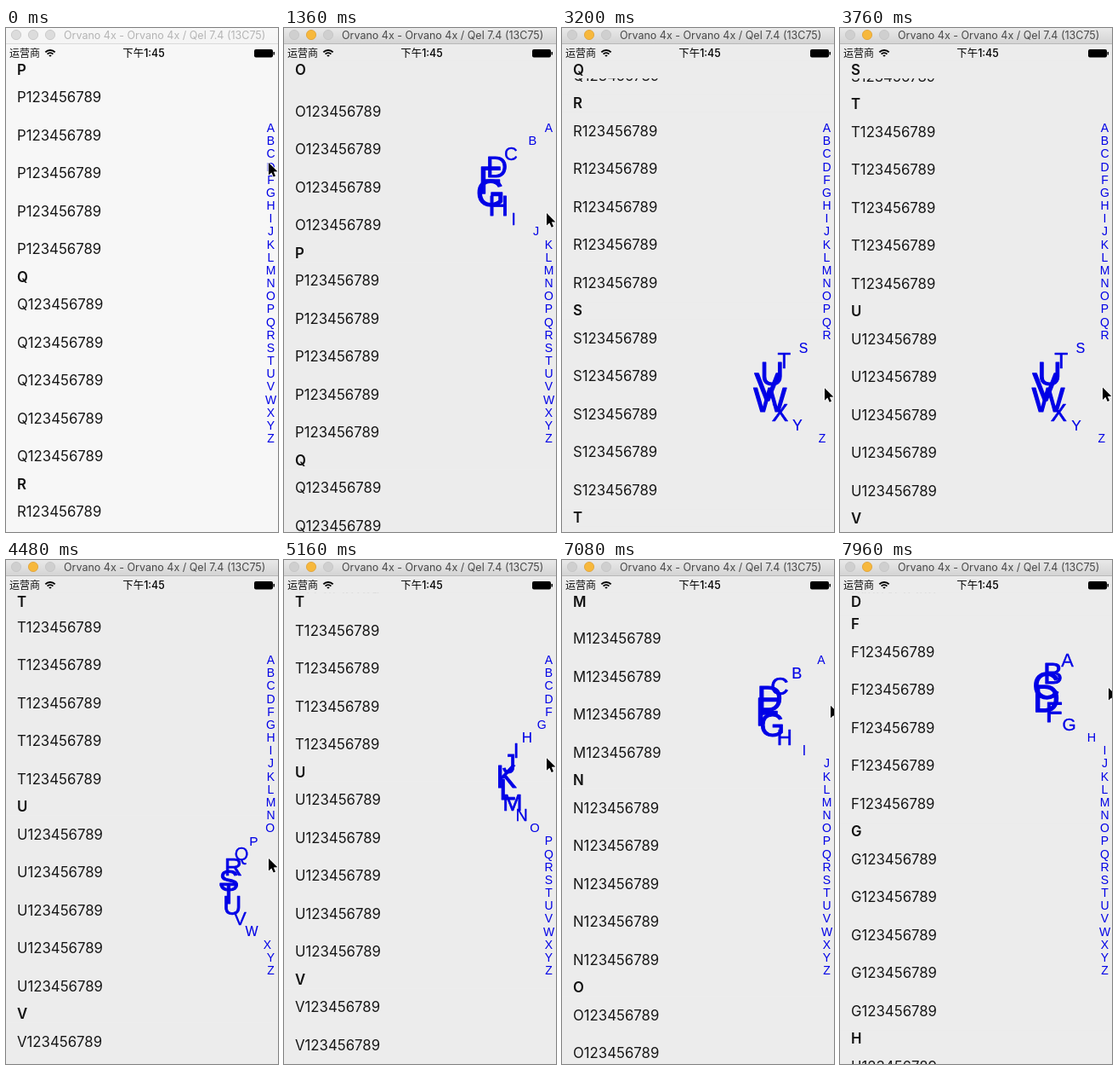
An HTML page with a canvas that plays this animation: 320x591 px, repeating every 8 s.

```html
<!DOCTYPE html>
<html lang="zh">
<head>
<meta charset="utf-8">
<title>Letter index</title>
<style>
  html, body { margin: 0; width: 100%; height: 100%; overflow: hidden; background: #f7f7f7; }
  canvas { display: block; width: 320px; height: 591px; }
</style>
</head>
<body>
<canvas id="stage"></canvas>
<script>
const W = 320, H = 591, LOOP = 8000;
const LETTERS = [...'ABCDFGHIJKLMNOPQRSTUVWXYZ'];
const ROWS = 5, ROW_H = 44.5, HEADER_H = 20.5, SECTION_H = ROWS * ROW_H + HEADER_H;
const LIST_TOP = 38.7, TEXT_X = 13, TEXT_SIZE = 16.75;
const UI_FONT = 'Inter, sans-serif';
const PRESS = 40, WAVE_LAG = 180;

// Pointer height in pixels and list position in sections, as [time, value].
const pointerPath = [[0, 158], [1180, 184], [1360, 217], [2220, 303], [2580, 423],
  [4100, 421], [4980, 257], [5500, 186], [6440, 186], [7960, 150]];
const listPath = [[0, 14], [1360, 13.115], [2400, 12.979], [3760, 17.833],
  [5160, 18.179], [6440, 16.424], [7960, 3.891]];

const canvas = document.getElementById('stage');
const ctx = canvas.getContext('2d');
const ratio = window.devicePixelRatio || 1;
canvas.width = W * ratio;
canvas.height = H * ratio;

const clamp = v => Math.min(1, Math.max(0, v));

function along(path, t) {
  const next = path.findIndex(point => point[0] > t);
  if (next < 0) return path[path.length - 1][1];
  if (next === 0) return path[0][1];
  const [t0, v0] = path[next - 1], [t1, v1] = path[next];
  return v0 + (v1 - v0) * (t - t0) / (t1 - t0);
}

// The wave trails the pointer and flattens while it travels.
function waveAt(t) {
  const centre = along(pointerPath, t - WAVE_LAG);
  const speed = Math.abs(centre - along(pointerPath, t - WAVE_LAG - 100)) * 10;
  const flatten = 20 * clamp((speed - 30) / 70);
  return {
    centre,
    bulge: (70 - flatten) * clamp((t - PRESS) / 200),
    reach: 61 + 0.45 * flatten
  };
}

function box(x, y, w, h, fill) {
  ctx.fillStyle = fill;
  ctx.fillRect(x, y, w, h);
}

function label(text, x, y, font, fill, align = 'left') {
  ctx.font = font;
  ctx.fillStyle = fill;
  ctx.textAlign = align;
  ctx.fillText(text, x, y);
}

function drawList(scroll, paper, lined) {
  ctx.save();
  ctx.beginPath();
  ctx.rect(0, LIST_TOP, W, H - LIST_TOP);
  ctx.clip();
  LETTERS.forEach((letter, i) => {
    const top = LIST_TOP + i * SECTION_H - scroll;
    if (top > H || top + SECTION_H < LIST_TOP) return;
    for (let r = 0; r < ROWS; r++) {
      const rowTop = top + HEADER_H + r * ROW_H;
      label(letter + '123456789', TEXT_X, rowTop + ROW_H / 2 + 5.8, `${TEXT_SIZE}px ${UI_FONT}`, '#161616');
      if (lined) box(TEXT_X, Math.round(rowTop + ROW_H) - 1, W - TEXT_X, 1, '#cfcfcf');
    }
    const pinned = top < LIST_TOP;
    const headTop = pinned ? Math.min(LIST_TOP, top + SECTION_H - HEADER_H) : top;
    box(0, headTop, W, HEADER_H, lined && !pinned ? '#ebebeb' : paper);
    label(letter, TEXT_X, headTop + HEADER_H / 2 + 5.8, `600 ${TEXT_SIZE}px ${UI_FONT}`, '#111');
  });
  ctx.restore();
}

function drawTitleBar(active) {
  const shade = ctx.createLinearGradient(0, 0, 0, 18);
  shade.addColorStop(0, active ? '#e9e9e9' : '#f7f7f7');
  shade.addColorStop(1, active ? '#d4d4d4' : '#f4f4f4');
  box(0, 0, W, 18, shade);
  box(0, 18, W, 1, active ? '#b8b8b8' : '#dadada');
  for (let i = 0; i < 3; i++) {
    const lit = active && i === 1;
    ctx.beginPath();
    ctx.arc(12 + 20 * i, 8, 5.6, 0, 7);
    ctx.fillStyle = lit ? '#f7b83c' : active ? '#cfcfcf' : '#dcdcdc';
    ctx.fill();
    ctx.lineWidth = 0.8;
    ctx.strokeStyle = lit ? '#dfa033' : '#c3c3c3';
    ctx.stroke();
  }
  label('Orvano 4x - Orvano 4x / Qel 7.4 (13C75)', 68, 13.3, `12.5px ${UI_FONT}`,
    active ? '#484848' : '#b4b4b4');
}

function drawStatusBar(paper) {
  const cjk = '"Noto Sans CJK SC", "Noto Sans CJK", sans-serif';
  box(0, 19, W, LIST_TOP - 19, paper);
  label('运营商', 4, 34, `12px ${cjk}`, '#111');
  label('下午1:45', 162, 34, `500 12.4px Inter, ${cjk}`, '#000', 'center');

  ctx.strokeStyle = '#000';
  ctx.lineWidth = 1.9;
  for (const radius of [1.5, 4.8, 8]) {
    ctx.beginPath();
    ctx.arc(52, 34, radius, -Math.PI * 0.75, -Math.PI * 0.25);
    ctx.stroke();
  }

  ctx.beginPath();
  ctx.roundRect(292, 25, 22, 9.5, 2);
  ctx.fill();
  box(314.5, 28, 1.5, 3.5, '#000');
}

function drawIndex({ centre, bulge, reach }) {
  ctx.lineJoin = 'round';
  LETTERS.forEach((letter, i) => {
    const y = 117 + i * 364 / 24;
    const lift = Math.max(0, 1 - ((y - centre) / reach) ** 2);
    const growth = 0.45 * bulge * lift ** 3;
    const size = 14 + growth;
    const x = 311.5 - bulge * lift, baseline = y + size * 0.36;
    label(letter, x, baseline, `${size}px "Liberation Sans", Arial, sans-serif`, '#0000e6', 'center');
    if (growth > 1) {
      ctx.strokeStyle = '#0000e6';
      ctx.lineWidth = growth * 0.045;
      ctx.strokeText(letter, x, baseline);
    }
  });
}

function drawPointer(x, y) {
  ctx.save();
  ctx.translate(x, y);
  const arrow = new Path2D('M0 0V14.5L3.4 11.4L5.7 16.6L8 15.6L5.8 10.5L10.4 10.3Z');
  ctx.lineWidth = 1.6;
  ctx.strokeStyle = '#fff';
  ctx.stroke(arrow);
  ctx.fillStyle = '#000';
  ctx.fill(arrow);
  ctx.restore();
}

function draw(t) {
  const active = t >= PRESS;
  const lined = t >= 5900 && t < 6900;
  const paper = active && !lined ? '#ececec' : '#f7f7f7';
  ctx.setTransform(ratio, 0, 0, ratio, 0, 0);
  box(0, 0, W, H, paper);
  drawList(along(listPath, t) * SECTION_H, paper, lined);
  drawStatusBar(paper);
  drawTitleBar(active);
  drawIndex(waveAt(t));
  drawPointer(309 + 7 * clamp((t - 5200) / 1200), along(pointerPath, t));
}

const start = performance.now();
function tick() {
  draw((performance.now() - start) % LOOP);
  requestAnimationFrame(tick);
}
tick();
</script>
</body>
</html>
```
